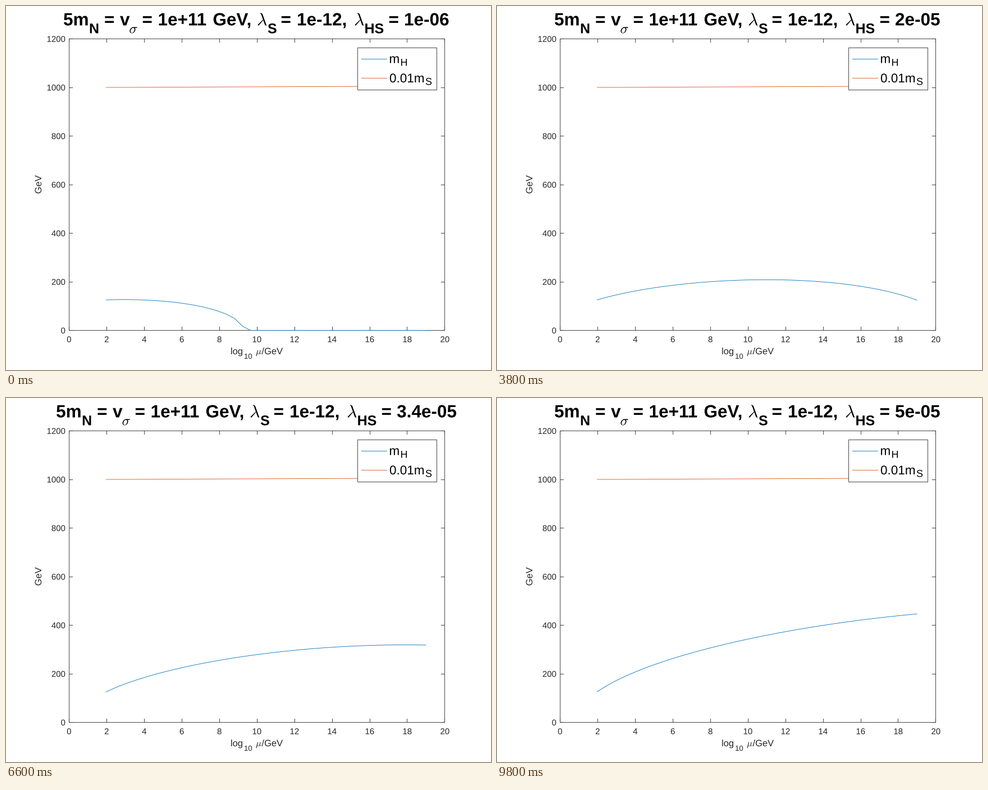
Recreate the animation shown at these times as a matplotlib script. Size 864 by 648 pixels, loop 10000 ms.

```python
import numpy as np
import matplotlib.pyplot as plt
from matplotlib.animation import FuncAnimation
from matplotlib.patches import PathPatch, Rectangle
from matplotlib.textpath import TextPath
from matplotlib.transforms import Affine2D

plt.rcParams["mathtext.fontset"] = "cm"

W, H, DPI = 864, 648, 100
LW = 0.85 * 72 / DPI
LEFT, RIGHT, TOP, BOTTOM = 112.32, 781.92, 58.5, 577.5
INK, BLUE, ORANGE = "#262626", "#0072BD", "#D95319"
FRAMES = 50

fig = plt.figure(figsize=(W / DPI, H / DPI), dpi=DPI, facecolor="white")
ax = fig.add_axes([0, 0, 1, 1])
ax.set_xlim(0, W)
ax.set_ylim(H, 0)
ax.axis("off")


def sx(x):
    return LEFT + (RIGHT - LEFT) * x / 20


def sy(y):
    return BOTTOM + (TOP - BOTTOM) * y / 1200


def mid(v):
    """Centre of the pixel that holds v."""
    return np.floor(v + 1e-6) + 0.5


def glyphs(s, x, y, size, weight="normal", align=0.0, angle=0):
    """Outline of s with its baseline starting at (x, y), in pixels."""
    path = TextPath((0, 0), s, size=size,
                    prop={"family": "Liberation Sans", "weight": weight})
    if align:
        box = path.get_extents()
        path = Affine2D().translate(-box.x0 - align * box.width, 0).transform_path(path)
    place = Affine2D().rotate_deg(angle).scale(1, -1).translate(x, y)
    return place.transform_path(path)


def put(path, color=INK, z=6):
    patch = PathPatch(path, facecolor=color, edgecolor="none", lw=0,
                      snap=False, zorder=z)
    ax.add_patch(patch)
    return patch


def line(xs, ys, color=INK, z=2):
    return ax.plot(xs, ys, color=color, lw=LW, zorder=z, snap=False,
                   solid_joinstyle="round", solid_capstyle="butt")[0]


def frame(x0, y0, x1, y1, z, fill="none"):
    ax.add_patch(Rectangle((x0, y0), x1 - x0, y1 - y0, fc=fill, ec=INK,
                           lw=LW, snap=False, zorder=z))


# axes box, ticks and tick labels
x0, x1 = mid(LEFT), mid(RIGHT)
frame(x0, TOP, x1, BOTTOM, 2)
TICK = 6.7
for v in range(0, 21, 2):
    x = mid(sx(v))
    line([x, x], [BOTTOM, BOTTOM - TICK])
    line([x, x], [TOP, TOP + TICK])
    put(glyphs(str(v), sx(v), 598.5, 15, align=0.5))
for v in range(0, 1201, 200):
    y = mid(sy(v))
    line([x0, x0 + TICK], [y, y])
    line([x1, x1 - TICK], [y, y])
    put(glyphs(str(v), 105.3, sy(v) + 5.4, 15, align=1))

# axis labels
put(glyphs("log", 400, 620, 16.5))
put(glyphs("10", 424, 628, 13.2))
put(glyphs(r"$\mu$", 445, 620, 16.5))
put(glyphs("/GeV", 455.5, 620, 16.5))
put(glyphs("GeV", 63, 317.5, 16.5, align=0.5, angle=90))

# legend
frame(626.5, 74.5, 767.5, 149.5, 5, "white")
line([633, 679], [94.5, 94.5], BLUE, 6)
line([633, 679], [128.5, 128.5], ORANGE, 6)
put(glyphs("m", 682.5, 101.5, 22.5), "black")
put(glyphs("H", 702.5, 106.5, 18), "black")
put(glyphs("0.01m", 683, 136, 22.5), "black")
put(glyphs("S", 747, 140.5, 18), "black")

# solver grid: one tiny first step, then even spacing
START, END = 1.96, 19
t = np.concatenate([[0], 0.027 + 0.426 * np.arange(40), [END - START]])
px = sx(START + t)

line(px, sy(1000 + 5.5 * t / t[-1]), ORANGE, 3)
curve = line(px, px * 0 + BOTTOM, BLUE, 4)


def higgs_mass(k):
    """Running mass for a portal coupling of k * 1e-6."""
    m2 = 15720 + t * (439.5 - 353 * t - 5.65 * t**2) + k * t * (263 + 5.69 * t)
    return np.sqrt(np.maximum(m2, 0))


# title: text, x of origin, is subscript
TITLE = [
    ("5m", 102, 0), ("N", 148, 1), ("=", 175, 0), ("v", 203, 0),
    (r"$\sigma$", 219.5, 1), ("=", 242.5, 0), ("1e+11", 270.5, 0),
    ("GeV,", 368.4, 0), (r"$\lambda$", 447, 0), ("S", 466, 1),
    ("=", 489.5, 0), ("1e-12,", 518, 0), (r"$\lambda$", 620, 0),
    ("HS", 638.5, 1), ("=", 681.5, 0), ("", 709, 0),
]


def title_paths(value):
    # two more characters push the centred title left
    shift = -12.9 if "." in value else 0
    return [glyphs(s or value, x + shift, 48.5 if sub else 34.5,
                   25 if sub else 31.5, "bold") for s, x, sub in TITLE]


title = [put(p, "black") for p in title_paths("1e-06")]


def update(i):
    k = i + 1
    curve.set_ydata(sy(higgs_mass(k)))
    for patch, path in zip(title, title_paths(f"{k * 1e-6:g}")):
        patch.set_path(path)
    return [curve, *title]


anim = FuncAnimation(fig, update, frames=FRAMES, interval=200,
                     repeat=True, repeat_delay=0, blit=False)
plt.show()
```
